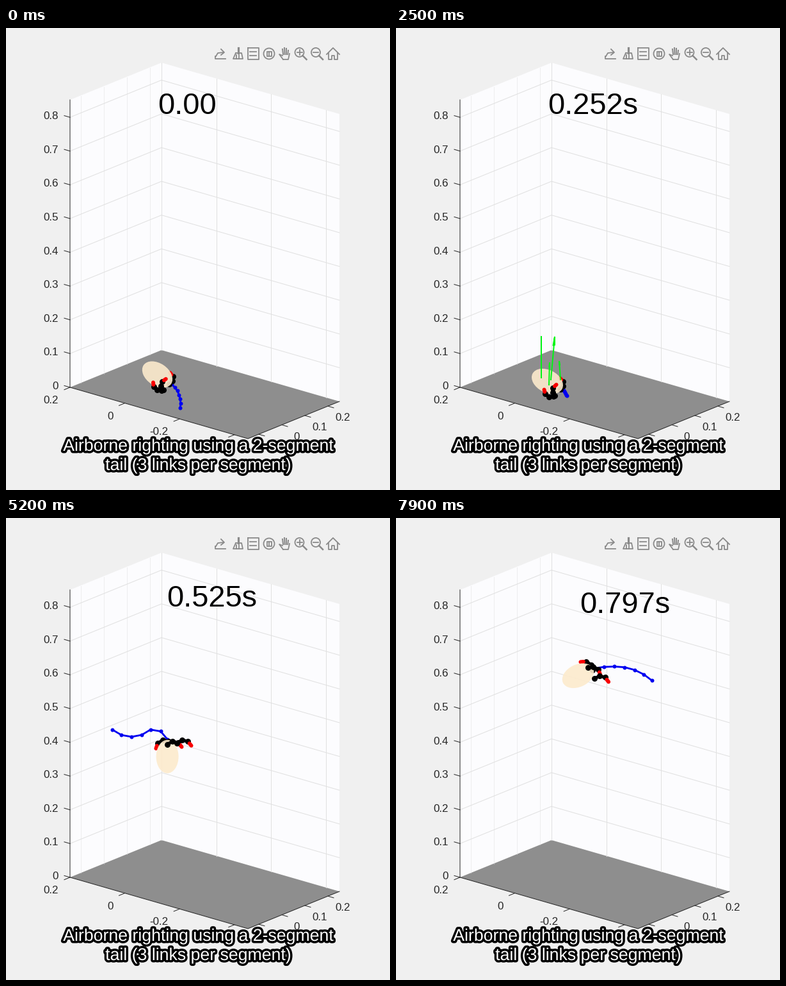
Write a matplotlib script that moves like this. It is 600 px wide and 720 px high and loops after 8000 ms.

```python
import numpy as np
import matplotlib.pyplot as plt
from matplotlib.animation import FuncAnimation
from matplotlib.patches import Circle, Ellipse, Polygon, Rectangle
from matplotlib.patheffects import withStroke

W, H, FRAMES = 600, 720, 80
PX = 0.72  # points per pixel at 100 dpi
plt.rcParams["font.family"] = "Liberation Sans"

BG, WALL, FLOOR = "#f0f0f0", "#fcfcfe", "#8e8e8e"
GRID, AXIS, ICON = "#e0e0e0", "#262626", "#8a8a8a"
SHELL, GREEN, RED, BLUE = "#fdebcd", "#00f514", "#f80000", "#0000f0"

fig = plt.figure(figsize=(6, 7.2), dpi=100, facecolor=BG)
ax = fig.add_axes([0, 0, 1, 1])
ax.set(xlim=(0, W), ylim=(H, 0))
ax.axis("off")


def line(pts, color, lw=1.0, z=2, **kw):
    x, y = np.transpose(pts) if len(pts) else ([], [])
    return ax.plot(x, y, color=color, lw=lw * PX, zorder=z, **kw)[0]


def label(x, y, s, size, color=AXIS, **kw):
    kw = {"ha": "center", "va": "center_baseline", "zorder": 3} | kw
    return ax.text(x, y, s, fontsize=size * PX, color=color, **kw)


# ---- plot box -------------------------------------------------------
L, B, R, F = map(np.array, ((100, 560), (243, 502), (521, 582), (378, 640)))
UP = np.array((0, -448))
TENTH = np.array((0, -52.6))
OUT_X, OUT_Y = np.array((9, 2.6)), np.array((-9, 3.7))


def draw_box():
    for quad, c in (((L, B, B + UP, L + UP), WALL), ((B, R, R + UP, B + UP), WALL),
                    ((L, B, R, F), FLOOR)):
        ax.add_patch(Polygon(quad, fc=c, ec="none", zorder=1))
    for i in range(9):
        p = TENTH * i
        if i:
            line([L + p, B + p, R + p], GRID)
        line([L + p, L + p - OUT_X], AXIS)
        label(82, 557 - 52.6 * i, f"{i / 10:g}", 17, ha="right")
    line([B, B + UP], GRID)
    for k in range(4):
        p = L + (B - L) * (17 + 36 * k) / 143
        line([p, p + UP], GRID, ls=(0, (1, 1)))
        q = p + F - L
        line([q, q + OUT_X], AXIS)
        if k:
            label(*(q + (23, 17)), f"{(k - 1) / 10:g}", 17)

        p = B + (R - B) * 85.6 * k / 278
        if k:
            line([p, p + UP], GRID)
        q = p + L - B
        line([q, q + OUT_Y], AXIS)
        if k < 3:
            label(q[0] - 18, q[1] + 19, f"{0.2 - 0.2 * k:g}", 17, ha="right")
    line([L + UP, L, F, R], AXIS)


def ring(x, y, r):
    ax.add_patch(Circle((x, y), r, fc="none", ec=ICON, lw=1.8 * PX, zorder=3))


def draw_toolbar():
    def stroke(*pts, lw=1.8):
        line(pts, ICON, lw, 3)

    # export
    stroke((327, 44), (327, 48), (343, 48))
    stroke((328, 44), (331, 39), (340, 38))
    stroke((336, 33), (341, 38), (336, 42))
    # brush
    stroke((363, 31), (363, 39), lw=3.2)
    stroke((359, 39), (368, 39), (370, 48), (355, 48), (359, 39))
    for x in (360, 364):
        stroke((x, 42), (x, 48))
    # data tip
    stroke((378, 31), (395, 31), (395, 49), (378, 49), (378, 31))
    for y in (37, 43):
        stroke((381, y), (391, y))
    # rotate
    ring(411, 40, 8.5)
    ax.add_patch(Rectangle((407.5, 36.5), 7, 7, fc="none", ec=ICON, lw=1.8 * PX, zorder=3))
    stroke((411, 37), (411, 43))
    # hand
    for i, top in enumerate((33, 31, 32, 35)):
        stroke((432 + 3 * i, top), (433 + 2.4 * i, 41), lw=2)
    stroke((433, 49), (427, 41), (432, 43))
    stroke((433, 49), (441, 49), (443, 40))
    # zoom in and out
    for x in (458.5, 484):
        ring(x, 38, 7)
        stroke((x + 5, 43), (x + 11, 49), lw=2.5)
        stroke((x - 4, 38), (x + 4, 38))
    stroke((458.5, 34), (458.5, 42))
    # home
    stroke((501, 41), (511, 31), (521, 41))
    stroke((504, 39), (504, 49), (509, 49), (509, 43), (513, 43), (513, 49),
           (518, 49), (518, 39))


def draw_caption():
    for y, s in ((659, "Airborne righting using a 2-segment"),
                 (689, "tail (3 links per segment)")):
        label(300, y, s, 26.67, "white", va="baseline", zorder=20,
              path_effects=[withStroke(linewidth=7 * PX, foreground="black")])


# ---- motion ---------------------------------------------------------
LIFT, APEX = 39, 74
KEYS = (40, 52, 64, 79)  # crouch, nose down, level, nose up


def ramp(f, a, b):
    u = np.clip((f - a) / (b - a), 0, 1)
    return u * u * (3 - 2 * u)


def unit(deg):
    a = np.radians(deg)
    return np.stack((np.cos(a), np.sin(a)), axis=-1)


def chain(start, headings, length):
    return np.vstack((start, start + np.cumsum(length * unit(headings), axis=0)))


def tilt(f):
    return np.interp(f, KEYS, (27, -90, 20, -25)) + 7 * (1 - ramp(f, 0, 8))


def centre(f):
    """Drop to the floor, rest, then fly; the shell swings about the mass centre."""
    x = 236.5 + 1.2 * max(f - LIFT, 0)
    y = min(540 + 0.29 * f * f, 550.5)
    if f > LIFT:
        y = min(y, 235 + 0.262 * (f - APEX) ** 2 - 10 * unit(tilt(f))[1])
    return np.array((x, y))


def legs(f):
    """Two like legs and one mirrored leg, hung from hips near the tail end."""
    u, v = unit(tilt(f)), unit(tilt(f) + 90)
    roll = np.cos(np.radians(np.interp(f, KEYS, (0, 90, 0, 107))))
    head = tilt(f) + np.interp(f, KEYS, (150, 60, 64, 15))
    size = 7 + 2 * ramp(f, LIFT, 48)
    bend = 40 * np.arange(3)
    hips = [19 * u + 17 * roll * v, 21 * u + 15 * v, 24 * u + 2 * v]
    turns = [head + bend, head + 60 * roll + bend, tilt(f) + 280 - bend]
    return [chain(h, t, size) for h, t in zip(hips, turns)]


def tail(f):
    """Curls up on the floor, then whirls with a wave running along it."""
    curl, free = ramp(f, 9, 15), ramp(f, LIFT, 45)
    head = max(45 + 12 * curl, 105 + 17.85 * (f - 45))
    wave = np.radians(18 * (f - 64))
    slack = 10 * (1 - curl)
    inner = slack + 46 * free * np.cos(wave + 0.13)
    outer = slack - 35 * free * np.cos(wave - 0.32)
    bends = np.cumsum([0, inner, inner, outer, outer, outer])
    return chain(27 * unit(tilt(f)), head + bends, 6.8 - 4.7 * curl + 14 * free)


def forces(f):
    """Floor reactions as (base, vector): a landing impulse, then steady support."""
    if 10 <= f < 18:
        return [((237, 555), (-19, -121)), ((252, 541), (-19, -102))]
    if 18 <= f <= LIFT:
        grow = (f - 25) / 2
        return [((227, 545), (0, -65)), ((242, 548), (6, -67 - grow)),
                ((239, 556), (1, -35 + grow)), ((257, 548), (-2, -29 + grow / 2))]
    return []


def arrow(base, vec):
    base, vec = np.array(base, float), np.array(vec, float)
    tip, neck = base + vec, base + 0.8 * vec
    side = np.array((0.2 * vec[0], 0))
    return [base, tip, neck + side, tip, neck - side, (np.nan, np.nan)]


draw_box()
draw_toolbar()
draw_caption()
clock = label(237, 134, "", 47, "black", ha="left", va="baseline", zorder=15)
shell = ax.add_patch(Ellipse((0, 0), 52, 35, fc=SHELL, ec="none", alpha=0.9, zorder=7))
tail_line = line([], BLUE, 2.8, 6, marker="o", ms=6 * PX, mew=0)
force_line = line([], GREEN, 2, 10, solid_joinstyle="bevel")
limbs, feet = [], []
for z in (8, 9, 6):
    limbs.append(line([], "black", 5, z, marker="o", ms=9 * PX, mew=0))
    feet.append(line([], RED, 6, z + 0.1, solid_capstyle="round"))


def update(f):
    c = centre(f)
    shell.center = c
    shell.angle = tilt(f)
    for leg, limb, foot in zip(legs(f), limbs, feet):
        pts = leg + c
        limb.set_data(*pts[:3].T)
        foot.set_data(*np.array((pts[2:].mean(axis=0), pts[3])).T)
    tail_line.set_data(*(tail(f) + c).T)
    pts = sum((arrow(*a) for a in forces(f)), [])
    force_line.set_data(*(np.transpose(pts) if pts else ([], [])))

    d = max(f - LIFT, 0)
    shift = 1.05 * d + 0.005 * d * d
    clock.set_position((237 + shift, 134 + 0.285 * shift))
    clock.set_text(f"{f * 0.01009:.3f}s" if f else "0.00")
    return [shell, tail_line, force_line, clock, *limbs, *feet]


anim = FuncAnimation(fig, update, frames=FRAMES, interval=100,
                     repeat=True, repeat_delay=0, blit=False)
plt.show()
```
